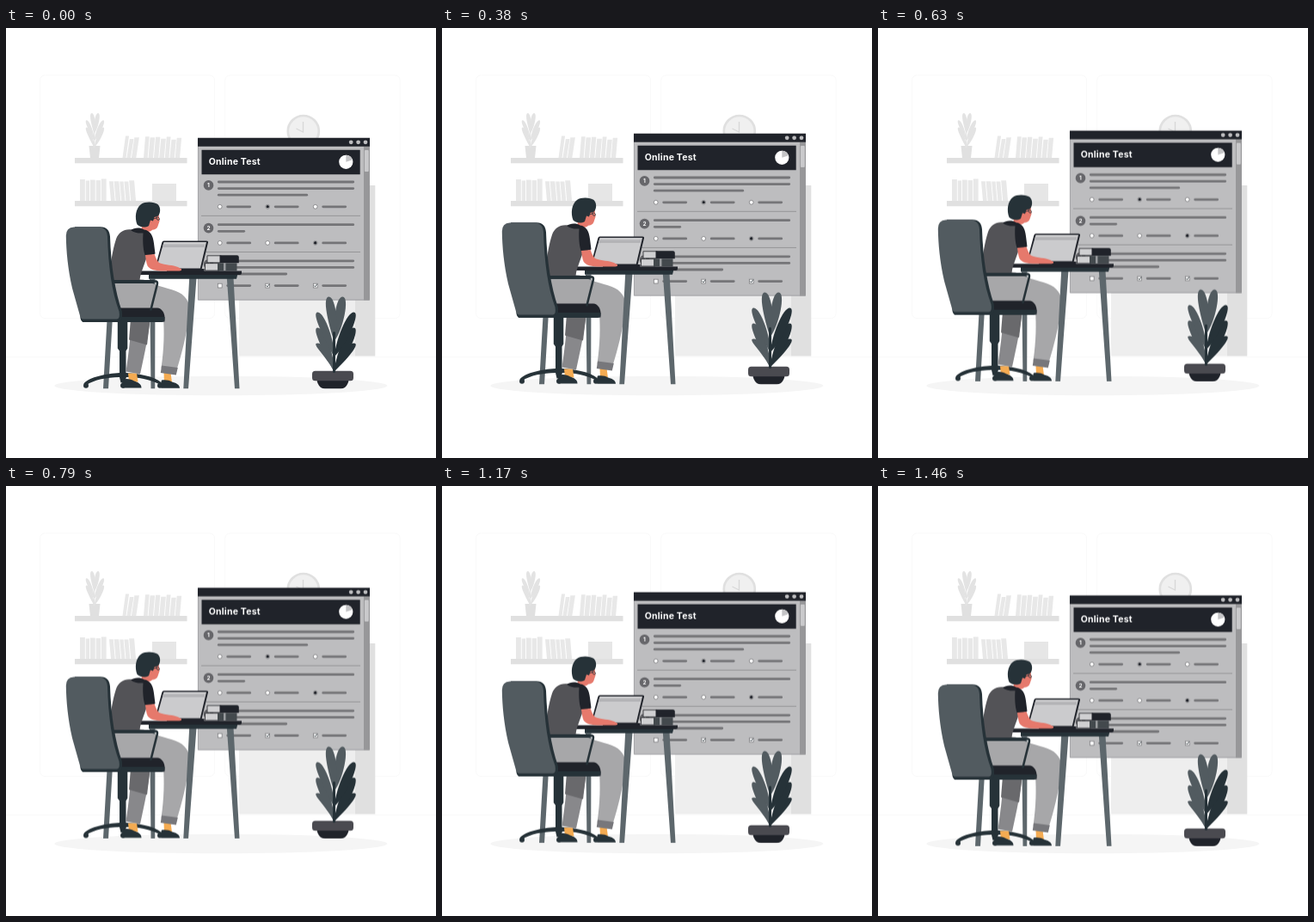
Recreate the animation shown at these times as an HTML page. Size 500 by 500 pixels, loop 1500 ms.

```html
<!DOCTYPE html>
<html lang="en">
<head>
<meta charset="utf-8">
<title>Online Test</title>
<style>
  html, body { margin: 0; height: 100%; overflow: hidden; background: #fff; }
  svg { display: block; width: 100vw; height: 100vh; }
  #scene { animation: bob 1.5s linear infinite; }
  @keyframes bob {
    0%, 100% { transform: translateY(.5px); }
    50% { transform: translateY(-9.5px); }
  }
  text { font-family: Inter, "Open Sans", sans-serif; font-weight: 700; fill: #fff; }
  .ink { fill: #263238; }
  .dark { fill: #20232a; }
  .skin { fill: #e6796c; }
  .ankle { fill: #f4ab52; }
  .metal { fill: #5d676c; }
  .line { fill: none; stroke: #263238; stroke-linecap: round; stroke-linejoin: round; }
</style>
</head>
<body>
<svg viewBox="0 0 500 500">
  <g id="room">
    <g fill="none" stroke="#ebebeb" stroke-width=".3">
      <rect x="39.5" y="55" width="203" height="282.6" rx="5.7"/>
      <rect x="254.7" y="55" width="203.5" height="282.6" rx="5.7"/>
      <path d="M0 382.5H500"/>
    </g>
    <g id="shelf">
      <path fill="#e0e0e0" d="M80 151h130.5v6.3H80ZM80 201h130.5v6.3H80Z"/>
      <path fill="#e6e6e6" d="M170 181h28v20h-28Z"/>
      <path fill="#e0e0e0" d="M96.5 137h13L108 151H98Z"/>
    </g>
    <circle cx="345.8" cy="120" r="18" fill="#f0f0f0" stroke="#e0e0e0" stroke-width="2.7"/>
    <path fill="none" stroke="#d8d8d8" stroke-width="1.3" d="M345.5 109V121L337.5 117"/>
    <path fill="#eee" d="M271 183H406V381.5H271Z"/>
    <path fill="#e0e0e0" d="M406 183H429.3V381.5H406Z"/>
    <ellipse cx="249.8" cy="416" rx="193.5" ry="11.3" fill="#f5f5f5"/>
  </g>

  <g id="scene">
    <g id="board">
      <path fill="#bdbdbf" stroke="#8c8c8e" stroke-width=".7" d="M223.4 128H422.5V315.7H223.4Z"/>
      <path fill="#979799" d="M416 137H422.8V316H416Z"/>
      <rect x="416.9" y="141.5" width="4.9" height="25" rx="1" fill="#c9c9cb"/>
      <path class="dark" d="M223 127.2H423V137.3H223ZM227.5 141.2H411.7V169.7H227.5Z"/>
      <text x="235.8" y="158.2" font-size="10.5" letter-spacing=".2">Online Test</text>
      <circle cx="395.3" cy="155.3" r="8.1" fill="#fff"/>
      <path fill="#c4c4c6" d="M395.3 155.3V147.2A8.1 8.1 0 0 1 403 152.8Z"/>
    </g>

    <g id="plant">
      <path class="dark" d="M361.5 409H398.5C397.5 415 394 419 389 419H371C366 419 362.5 415 361.5 409Z"/>
      <rect x="356" y="398.2" width="48" height="11.6" rx="3.5" fill="#4a4a50"/>
    </g>

    <path class="metal" d="M118 330H124.3L119 419H113ZM167 291H173.5L173.2 419H168.5Z"/>

    <g id="chairBase" class="ink">
      <path d="M129.8 339H141.3V372L139.5 375V403H132V375L129.8 372Z"/>
      <path d="M90.5 413C97 405 117 401.5 132 400.5H140C154 401.5 172 404 181 412L179 414C168 408 153 405.5 140 405.5L137.5 412H133.5L132 405.5C117 406 103 408 93 415Z"/>
    </g>

    <g id="backLeg">
      <path class="ankle" d="M142 401H152L153.5 411H143Z"/>
      <path class="ink" d="M136 408C141 406.5 146 408 149 410C153 411.5 157.5 413 157.5 418H135.5C134.5 414 135 411 136 408Z"/>
      <path fill="#88888b" d="M146 325H169C167 352 161 379 156 402L139.5 399C143 375 146 351 146 325Z"/>
      <path fill="#69696c" d="M146 325H169L164 368L143 362Z"/>
    </g>

    <g id="frontLeg">
      <path class="ankle" d="M183.5 400H191.500L193 412H184Z"/>
      <path class="ink" d="M181 409C186 408.5 190 409 193 411C197 412 202 414 202 418.3H180.5C179.5 415 180 412 181 409Z"/>
      <path fill="#a7a7a9" d="M122 288L160 292C178 301 191 302 201 307C211 312 215 322 213 333C210 356 205 376 198.500 397L180.500 395C184 371 184 352 183 337C165 334 142 333 128 331Z"/>
      <path fill="#77777b" d="M181 392L199.800 394.500L197.800 403L179.800 400.500Z"/>
    </g>

    <g id="seat">
      <path class="dark" d="M132 325H176C181 325 184.5 331 184.5 336V341H132Z"/>
      <path class="ink" d="M87 335.5H184.5V338C184.5 340.5 183 341.5 181 341.5H90C88 341.5 87 339 87 335.5Z"/>
    </g>

    <g id="laptop">
      <path class="dark" d="M183.5 247H233Q235.500 247 235 249L227.500 280H173L181.300 249Q182 247 183.500 247Z"/>
      <path fill="#cbcbcd" d="M183.500 248.600H233L225.800 279H174.800Z"/>
      <path fill="#b3b3b6" d="M182.800 251H231.300L230.500 254.500H181.900Z"/>
      <path class="dark" d="M187 279.500H230.500V282.500H187Z"/>
    </g>

    <g id="books">
      <path fill="#d0d0d2" stroke="#26282d" stroke-width=".8" d="M234 264.3h16v8h-16ZM231.5 273.2h16.5v8.3h-16.5Z"/>
      <path class="dark" d="M248.5 263.7H268.5Q270.8 263.7 270.8 266V272.8H248.5Z"/>
      <path fill="#43494d" d="M246 272.8h22.5v9.2h-22.5Z"/>
      <path fill="#989a9d" d="M253 272.8h2.5v9.2h-2.5Z"/>
    </g>

    <g id="desk">
      <path class="metal" d="M213.2 290H221.5L212 419H206.3ZM256.8 290H264.5L271.5 419H266Z"/>
      <path class="ink" d="M166 285H269.5L268 291.3H166Z"/>
      <path class="dark" d="M150 282H274V284.5Q274 286.5 272 286.5H150Z"/>
    </g>

    <g id="man">
      <path fill="#535357" d="M146 234C137 233 131 237 128 245C124 257 121 275 120 292C131 294 145 293.5 155.500 292.5C157 280 165 268 167 252C168 243 165 236 160 234Z"/>
      <path class="skin" d="M158 226L170 224V234.500C167 237 162 237 157.500 234.500Z"/>
      <path class="dark" d="M145 234.5C149 231.5 156 231 160.500 234C168 235 171 241 172 250L173.500 262C169 264 165 264.500 161.500 263.500C159 255 159 245 159.500 238C154 238.500 149 237.500 145 234.500Z"/>
      <path class="skin" d="M162 263.500L172.700 262.500C174 267 176 270.500 178 272.500C186 275.500 194 275 200 277.500L204 279.800Q204.500 282 201.500 282H184C174 282 167 280.500 164.500 276C163 272 162.500 268 162 263.500Z"/>
      <path class="skin" d="M164 214L177 211.500L178.500 224L176.500 230C175 234 171 235 167 234L162 229Z"/>
      <path class="ink" d="M152.500 228C149.500 220 150.500 209.500 157 204.500C162 201 172 201.500 176.500 204.500C180 208 180 214 177 218L172.500 219.500L171 224L168 223L166 229.500C162 232 156 231.500 152.500 228Z"/>
      <path class="line" stroke-width=".8" d="M171 221.500L175 220.500M175 219.500Q179 219 178.300 222.500Q175 224 175 219.500"/>
    </g>

    <g id="chairBack">
      <path class="line" stroke-width="4" d="M124 294.500H171"/>
      <path class="line" stroke-width="2.600" d="M169 294H174.500Q176.500 294.500 175.700 298L168.500 327"/>
      <path class="ink" d="M80 230.800H110C117 230.800 120.500 235 121 242C122 276 127 306 134.800 329Q136 337 133 341H91Q87.500 341 86.500 337Z"/>
      <path fill="#525b60" d="M79 231H107C114.500 231 117.500 235 118 242C119 277 123 306 131.500 329Q133 337.500 129 338H90Q87 338 86 334L77 302C72 280 70 259 69.800 241Q69.800 231.500 79 231Z"/>
    </g>
  </g>
</svg>
<script>
  const add = (id, tag, attrs, text = "") => {
    const el = document.createElementNS("http://www.w3.org/2000/svg", tag);
    for (const k in attrs) el.setAttribute(k, attrs[k]);
    el.textContent = text;
    document.getElementById(id).append(el);
  };
  const dot = (id, cx, cy, r, fill) => add(id, "circle", { cx, cy, r, fill });

  let seed = 7;
  const rand = (lo, hi) => {
    seed = seed * 16807 % 2147483647;
    return lo + (hi - lo) * seed / 2147483647;
  };

  // Fill a stretch of shelf with upright or leaning books.
  const books = (from, to, floor, lean) => {
    for (let x = from; x < to - 4;) {
      const w = Math.min(rand(4, 6), to - x), h = rand(21, 26);
      add("shelf", "path", { fill: "#e8e8e8", d: `M${x} ${floor}h${w}l${lean} ${-h}h${-w}Z` });
      x += w + .9;
    }
  };
  books(135.5, 153, 151, 3.5);
  books(160, 204, 151, 2);
  books(86, 118, 201, 0);
  books(122, 155, 201, -2);

  // Rows of leaf pairs on a stem; each leaf rises, then bows outward to a round tip.
  const plant = (id, x, base, size, rows, pale, deep) => {
    for (let row = rows - 1; row >= 0; row--) {
      for (const side of [1, -1]) {
        const reach = side * (row ? 21 : 8) * size, w = 4.2 * size;
        const top = base + (row * 18 - 87) * size;
        const foot = Math.min(base, top + 52 * size);
        const tip = x + reach + 2 * size, mid = x + reach * .3;
        add(id, "path", {
          fill: side > 0 && row ? deep : pale,
          d: `M${x} ${foot}C${mid - w} ${foot - 20 * size} ${tip - w * 2} ${top} ${tip} ${top}` +
             `S${mid + w * 2} ${foot - 14 * size} ${x} ${foot}Z`
        });
      }
    }
    add(id, "path", { class: "line", style: `stroke:${deep}`, "stroke-width": 3 * size, d: `M${x} ${base}v${-45 * size}` });
  };
  plant("shelf", 102.5, 139, .46, 3, "#e3e3e3", "#e3e3e3");
  plant("plant", 381.5, 399, 1, 4, "#525b60", "#263238");

  for (let i = 0; i < 3; i++) {
    dot("board", 401.2 + 8.4 * i, 132.3, 2.4, "#bdbdbf");
    dot("chairBase", 93 + 43 * i, 415.3, 3);
  }

  const bar = (from, to, y) => add("board", "path", {
    d: `M${from + 1.3} ${y}H${to - 1.3}`, stroke: "#747477", "stroke-width": 2.8, "stroke-linecap": "round"
  });

  const option = (x, y, picked, square) => {
    const r = 2.4;
    add("board", "rect", {
      x: x - r, y: y - r, width: 2 * r, height: 2 * r, rx: square ? 0 : r,
      fill: "#fff", stroke: "#727275", "stroke-width": .7
    });
    if (picked && square) add("board", "path", { class: "line", "stroke-width": .8, d: `M${x - 1.4} ${y}l1.2 1.3l2-2.800` });
    else if (picked) dot("board", x, y, 1.8, "#20232a");
    bar(x + 7.7, x + 36.3, y);
  };

  // Each question flows below the one before it.
  let y = 178.5;
  const question = (num, lines, lastEnd, picks, square) => {
    dot("board", 235.5, y + 3.9, 5.8, "#66666a");
    add("board", "text", { x: 235.5, y: y + 6.2, "font-size": 6.5, "text-anchor": "middle" }, num);
    for (let i = 1; i <= lines; i++, y += 7.6) bar(246, i < lines ? 405 : lastEnd, y);
    y += 6;
    for (let i = 0; i < 3; i++) option(248.7 + 55.5 * i, y, picks.includes(i), square);
    y += 10.6;
    if (num < 3) add("board", "path", { d: `M227 ${y}H412`, stroke: "#8c8c8e", "stroke-width": .8 });
    y += 10.3;
  };
  question(1, 3, 351, [1]);
  question(2, 2, 278, [2]);
  question(3, 3, 327, [1, 2], true);
</script>
</body>
</html>
```
